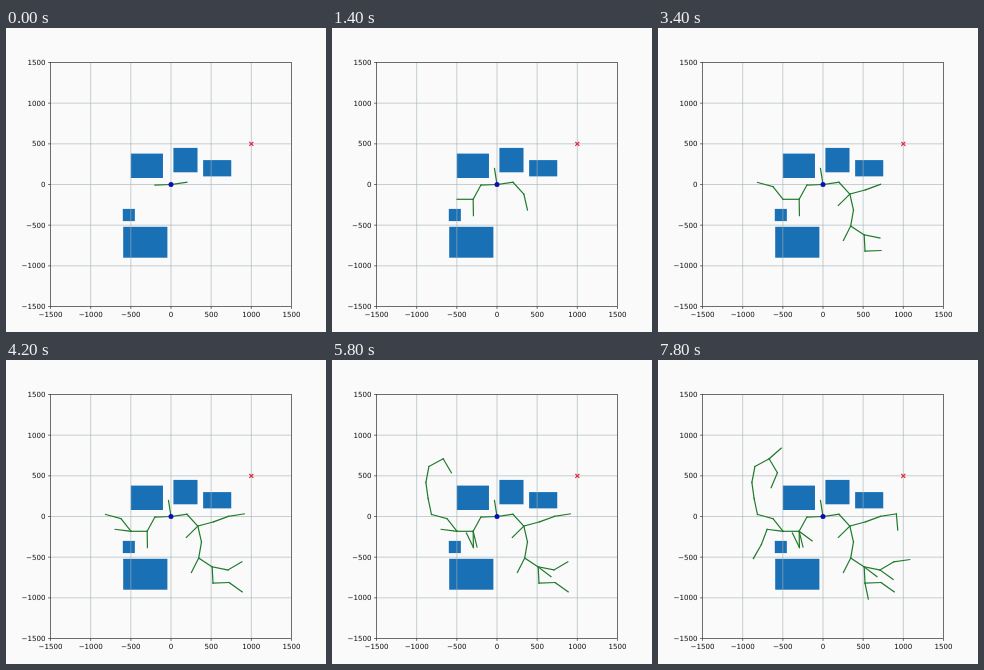
Recreate the animation shown at these times as an HTML page. Size 320 by 304 pixels, loop 8 s.

```html
<!DOCTYPE html>
<html lang="en">
<head>
<meta charset="utf-8">
<title>Growing search tree</title>
<style>
  html, body { margin: 0; width: 100%; height: 100%; overflow: hidden; background: #fafafa; }
  svg { display: block; width: 100%; height: 100%; }
  text { font: 7.1px "DejaVu Sans", sans-serif; fill: #111; }
  .block { fill: #1a70b5; }
  .grid { stroke: #a3b1b2; stroke-width: .6; }
  .axis { stroke: #333; stroke-width: .7; fill: none; }
  .edge { stroke: #1f7a2b; stroke-width: 1.2; stroke-linecap: square; }
  .goal { stroke: #e0203c; stroke-width: 1.1; }
  .root { fill: #0e0eb4; }
</style>
</head>
<body>
<!-- Half-pixel offset puts whole coordinates on pixel centres -->
<svg viewBox="-0.5 -0.5 320 304"></svg>
<script>
const svg = document.querySelector('svg');
const STEP = 200, LOOP = 8000, EDGE = 200, LIMIT = 1500;
const plot = { x: 44, y: 34, width: 241, height: 244 };
const bottom = plot.y + plot.height;
const scaleX = plot.width / (2 * LIMIT), scaleY = plot.height / (2 * LIMIT);
const px = v => plot.x + (v + LIMIT) * scaleX;
const py = v => bottom - (v + LIMIT) * scaleY;

function add(tag, attrs, text) {
  const el = document.createElementNS('http://www.w3.org/2000/svg', tag);
  for (const key in attrs) el.setAttribute(key, attrs[key]);
  if (text) el.textContent = text;
  return svg.appendChild(el);
}
const line = (cls, x1, y1, x2, y2) => add('line', { class: cls, x1, y1, x2, y2 });

function block(x, y, w, h) {
  add('rect', { class: 'block', x: px(x), y: py(y + h), width: w * scaleX, height: h * scaleY });
}
block(-500, 80, 400, 300);
block(30, 150, 300, 300);
block(400, 100, 350, 200);
block(-600, -450, 150, 150);
block(-595, -900, 550, 380);

for (let v = -LIMIT; v <= LIMIT; v += 500) {
  const x = px(v), y = py(v), label = String(v).replace('-', '\u2212');
  if (Math.abs(v) < LIMIT) {
    line('grid', x, plot.y, x, bottom);
    line('grid', plot.x, y, plot.x + plot.width, y);
  }
  line('axis', x, bottom, x, bottom + 2.4);
  line('axis', plot.x - 2.4, y, plot.x, y);
  add('text', { x, y: bottom + 10.3, 'text-anchor': 'middle' }, label);
  add('text', { x: plot.x - 4.9, y: y + 2.6, 'text-anchor': 'end' }, label);
}
add('rect', { class: 'axis', ...plot });

// Every edge has the same length, so a branch is a start node and its headings in degrees.
const nodes = [[0, 0]], edges = [];
function grow(parent, ...headings) {
  for (const heading of headings) {
    const angle = heading * Math.PI / 180;
    const [x, y] = nodes[parent];
    const tip = [x + EDGE * Math.cos(angle), y + EDGE * Math.sin(angle)];
    edges.push(line('edge', px(x), py(y), px(tip[0]), py(tip[1])));
    parent = nodes.push(tip) - 1;
  }
}

// Branches in order of growth
grow(0, 8);
grow(0, 182);
grow(0, 99);
grow(2, 241, 180);
grow(4, -89);
grow(1, -47, -77);
grow(5, 129, 165);
grow(8, 260);
grow(7, 15, 20);
grow(7, 224);
grow(11, 243);
grow(11, -33, -11);
grow(16, -87, 2);
grow(5, 173);
grow(13, 9);
grow(17, 30);
grow(19, -35);
grow(6, 116);
grow(10, 102, 98, 79, 28, -59);
grow(4, -76);
grow(16, -37);
grow(17, -35);
grow(22, 8);
grow(18, -78);
grow(20, 249, 240);
grow(28, 41);
grow(29, 247);
grow(21, -85);
grow(4, -36);

const goalX = px(1000), goalY = py(500);
for (const d of [-2, 2]) line('goal', goalX - 2, goalY - d, goalX + 2, goalY + d);
add('circle', { class: 'root', cx: px(0), cy: py(0), r: 2.5 });

function draw() {
  const step = Math.floor(performance.now() % LOOP / STEP);
  const grown = Math.max(2, Math.floor(1.4 + 1.04 * step));
  edges.forEach((edge, i) => { edge.style.visibility = i < grown ? 'visible' : 'hidden'; });
  requestAnimationFrame(draw);
}
draw();
</script>
</body>
</html>
```
